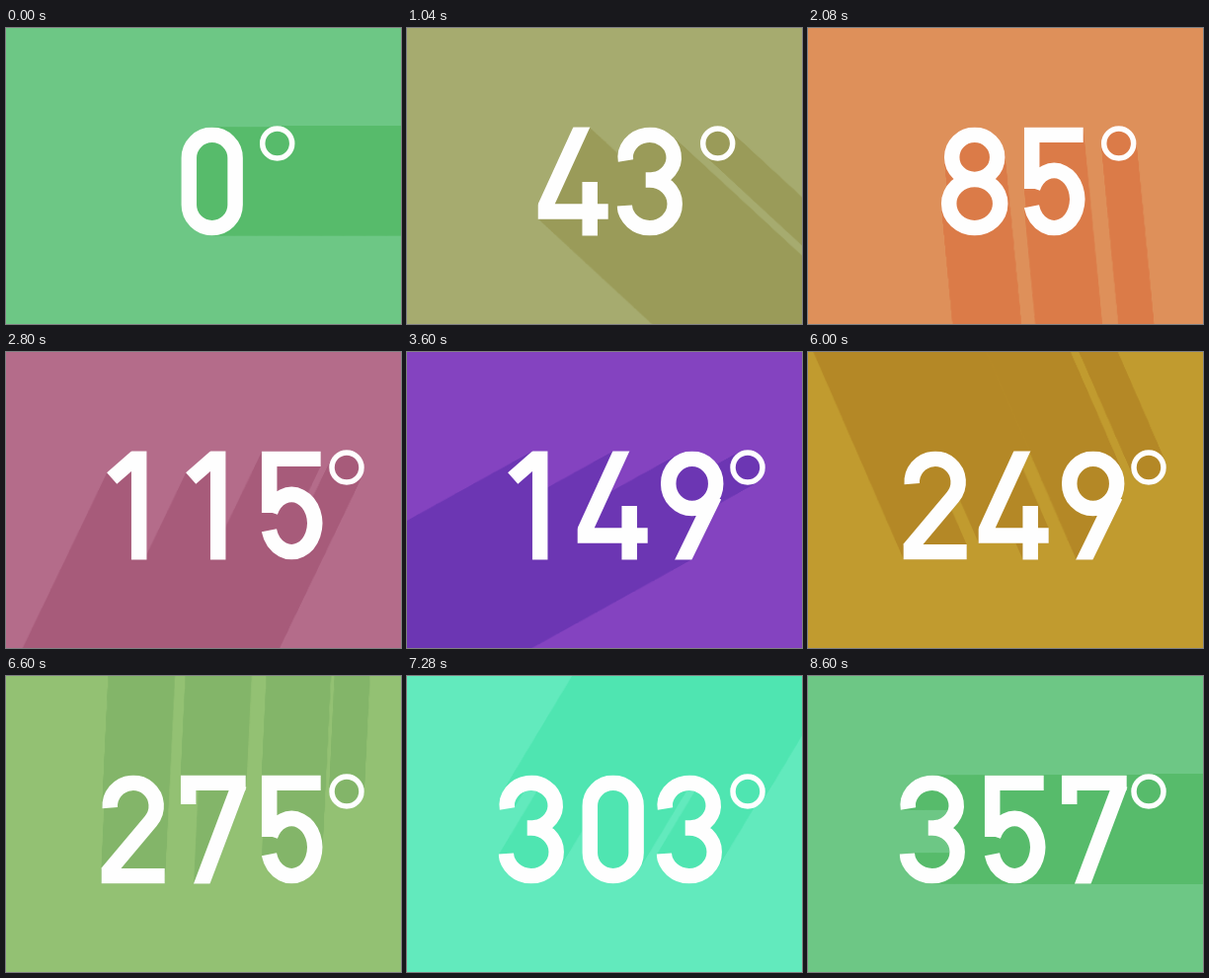
Write an HTML page with a canvas that moves like this. It is 400 px wide and 300 px high and loops after 8.64 s.

```html
<!DOCTYPE html>
<html lang="en">
<head>
<meta charset="utf-8">
<title>Degrees</title>
<style>
html, body { margin: 0; width: 100%; height: 100%; overflow: hidden; }
canvas { display: block; width: 100vw; height: 100vh; }
</style>
</head>
<body>
<canvas id="stage" width="400" height="300"></canvas>
<script>
const W = 400, H = 300, LOOP = 8640, STEP = 40, TURN = 180;
const WEIGHT = 15.5, TOP = 100.6, BOTTOM = 210.4, HALF = 36, PITCH = 80;
const HEAD = TOP + WEIGHT / 2, FOOT = BOTTOM - WEIGHT / 2;
const PI = Math.PI;

// Centre lines of the digits around x = 0; ends past the cell are clipped flat.
function bowl(p, x, top, bottom, rx, from = 0, to = 2 * PI) {
  const ry = (bottom - top) / 2;
  p.moveTo(x + rx * Math.cos(from), top + ry + ry * Math.sin(from));
  p.ellipse(x, top + ry, rx, ry, 0, from, to);
}
const line = (p, d) => p.addPath(new Path2D(d));

function nine(p) {
  bowl(p, 0, HEAD, 158.5, 24);
  line(p, 'M22.5 146L-13 219');
}

const DIGITS = [
  p => p.roundRect(-23.4, HEAD, 46.8, FOOT - HEAD, 23.4),
  p => line(p, 'M-21.5 128L6 104V220'),
  p => {
    bowl(p, 0, HEAD, HEAD + 47, 23.5, PI - 0.08, 2 * PI + 0.7);
    p.lineTo(-26.5, 200);
    line(p, `M-32 ${FOOT}H32`);
  },
  p => {
    bowl(p, -3, HEAD, 154, 24.5, PI - 0.15, 2.5 * PI);
    p.lineTo(-7, 154);
    bowl(p, -3, 154, FOOT, 25.5, -PI / 2, PI - 0.07);
  },
  p => line(p, 'M12 92L-31 186H35M16.5 156V220'),
  p => {
    line(p, `M30 ${HEAD}H-22V163`);
    bowl(p, 0.5, 144.5, FOOT, 23.5, -PI + 0.4, PI - 0.25);
  },
  p => {
    const turned = new Path2D();
    nine(turned);
    p.addPath(turned, new DOMMatrix([-1, 0, 0, -1, 0, TOP + BOTTOM]));
  },
  p => line(p, `M-24 130V${HEAD}H34M27.5 110L-14 220`),
  p => {
    bowl(p, 0, HEAD, 153.5, 23);
    bowl(p, 0, 153.5, FOOT, 26);
  },
  nine
].map(build => {
  const path = new Path2D();
  build(path);
  return path;
});

const cell = new Path2D();
cell.rect(-HALF, TOP, 2 * HALF, BOTTOM - TOP);

const KEYS = [
  { at: 0, angle: 0, back: '#6dc785', shade: '#57bb6b' },
  { at: 85, angle: 84.5, back: '#de905a', shade: '#db7b48' },
  { at: 149, angle: 151, back: '#8443c0', shade: '#6c36b3' },
  { at: 205, angle: 204.5, back: '#a1845c', shade: '#91704b' },
  { at: 249, angle: 246.5, back: '#c19b2f', shade: '#b48826' },
  { at: 303, angle: 301, back: '#62eabd', shade: '#4fe5b1' },
  { at: 357, angle: 360, back: '#6dc785', shade: '#57bb6b' }
];

const mix = (a, b, u) => a + (b - a) * u;
const channels = hex => [1, 3, 5].map(i => parseInt(hex.slice(i, i + 2), 16));
function mixColor(a, b, u) {
  const end = channels(b);
  return `rgb(${channels(a).map((v, i) => Math.round(mix(v, end[i], u)))})`;
}

function context(canvas) {
  canvas.width = W;
  canvas.height = H;
  return canvas.getContext('2d');
}
const stage = context(document.getElementById('stage'));
const smear = context(document.createElement('canvas'));
const shadow = context(document.createElement('canvas'));

function drawLabel(ctx, text, color, dx = 0, dy = 0) {
  const count = text.length;
  let x = 208.7 - (count - 1) / 2 * PITCH;
  ctx.strokeStyle = color;
  ctx.lineWidth = WEIGHT;
  for (const digit of text) {
    ctx.save();
    ctx.translate(x + dx, dy);
    ctx.clip(cell);
    ctx.stroke(DIGITS[digit]);
    ctx.restore();
    x += PITCH;
  }
  const ring = x - PITCH + (count < 3 ? 66 : 56.3);
  ctx.lineWidth = 5.5;
  ctx.beginPath();
  ctx.arc(ring + dx, 117 + dy, 15, 0, 2 * PI);
  ctx.stroke();
}

// A short smear of the label is stamped repeatedly, then tinted.
function drawShadow(text, color, angle) {
  const run = 22, cos = Math.cos(angle), sin = Math.sin(angle);
  smear.clearRect(0, 0, W, H);
  for (let d = 0; d <= run; d++) drawLabel(smear, text, '#000', cos * d, sin * d);
  shadow.globalCompositeOperation = 'source-over';
  shadow.clearRect(0, 0, W, H);
  for (let d = 0; d < 500; d += run) shadow.drawImage(smear.canvas, cos * d, sin * d);
  shadow.globalCompositeOperation = 'source-in';
  shadow.fillStyle = color;
  shadow.fillRect(0, 0, W, H);
  stage.drawImage(shadow.canvas, 0, 0);
}

function draw(tick) {
  const label = Math.max(0, 2 * Math.round(tick * STEP * TURN / LOOP) - 1);
  const next = Math.max(1, KEYS.findIndex(key => key.at >= label));
  const a = KEYS[next - 1], b = KEYS[next];
  const u = (label - a.at) / (b.at - a.at);
  const text = String(label);
  stage.fillStyle = mixColor(a.back, b.back, u);
  stage.fillRect(0, 0, W, H);
  drawShadow(text, mixColor(a.shade, b.shade, u), mix(a.angle, b.angle, u) * PI / 180);
  stage.filter = 'blur(0.5px)';
  drawLabel(stage, text, '#fefefe');
  stage.filter = 'none';
}

let last = -1;
function frame() {
  const tick = Math.floor(performance.now() % LOOP / STEP);
  if (tick !== last) draw(last = tick);
  requestAnimationFrame(frame);
}
frame();
</script>
</body>
</html>
```
